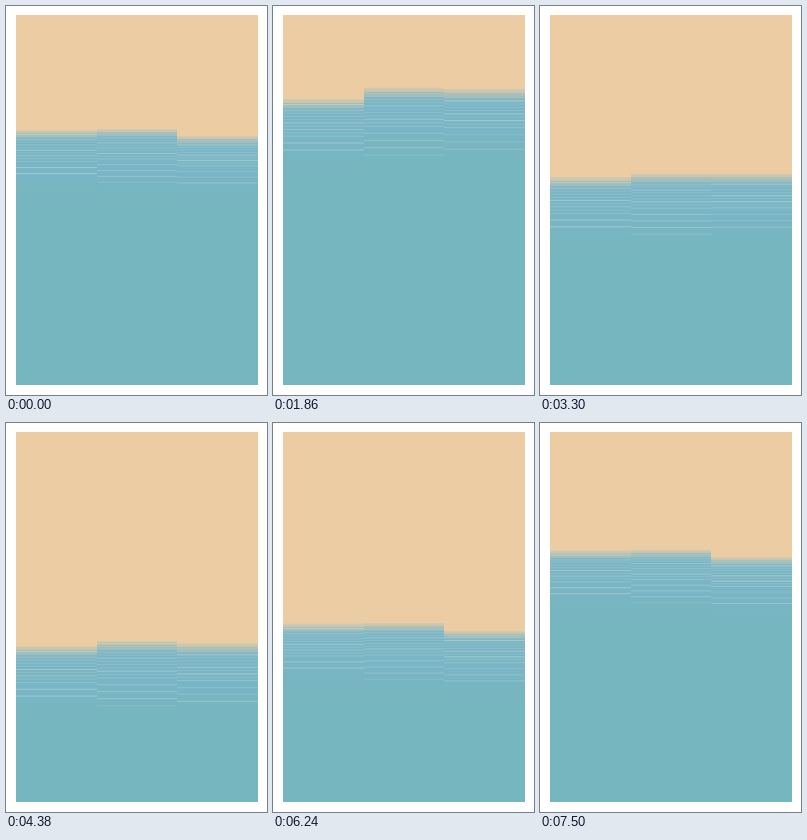
An HTML page with a canvas that plays this animation: 261x389 px, repeating every 7.56 s.

```html
<!DOCTYPE html>
<html>
<head>
<meta charset="utf-8">
<style>
html, body { margin: 0; width: 100%; height: 100%; overflow: hidden; background: #fff; }
canvas { display: block; }
</style>
</head>
<body>
<canvas id="sea" width="261" height="389"></canvas>
<script>
const ctx = document.getElementById('sea').getContext('2d');
const LOOP = 7560, STEP = 60, RAD = Math.PI / 180;
const LEFT = 10, TOP = 9, WIDTH = 242, HEIGHT = 370, DEPTH = 72;
const sand = 'rgb(235,204,163)', water = 'rgb(118,182,190)';
const blue = 'rgb(121,181,197)', foam = 'rgb(232,236,222)';

// swell is the rise and fall; chop is a second harmonic that fades with depth.
const columns = [
  { mean: 160, swell: 74.5, phase: 60, chop: 2, count: 9 },
  { mean: 155, swell: 77, phase: 62, chop: 6, count: 11 },
  { mean: 159, swell: 78, phase: 65, chop: 6, count: 10 }
];

function seeded(seed) {
  return () => (seed = seed * 16807 % 2147483647) / 2147483647;
}

function waveHeight({ mean, swell, phase, chop, count }, i, angle) {
  return mean + 4.6 * i ** 1.12
    - swell * Math.cos((angle - phase + 0.35 * i) * RAD)
    + chop * (1 - i / count) * Math.cos(2 * (angle - 157) * RAD);
}

function drawColumn(column, index, angle) {
  const x = LEFT + Math.round(WIDTH * index / 3);
  const w = LEFT + Math.round(WIDTH * (index + 1) / 3) - x;
  const random = seeded(index + 7);
  const height = i => waveHeight(column, i, angle);
  const fill = (y, h, alpha) => {
    ctx.globalAlpha = alpha;
    ctx.fillRect(x, y, w, h);
  };

  const surface = height(0);
  const fade = ctx.createLinearGradient(0, surface, 0, surface + DEPTH);
  fade.addColorStop(0.6, blue);
  fade.addColorStop(1, water);
  ctx.fillStyle = fade;
  for (let i = 0; i < 4; i++) {
    fill(height(i * 0.8), TOP + HEIGHT - height(i * 0.8), Math.min(1, 0.28 + 0.24 * i));
  }

  ctx.fillStyle = foam;
  for (let i = 0; i < column.count; i++) {
    fill(height(i), 1, 0.12 + 0.28 * random());
    // Fainter ripples fill the gaps near the surface.
    if (i > 0 && i < 6) fill(height(i + 0.5), 1, 0.16);
  }
  ctx.globalAlpha = 1;
}

function draw(now) {
  const t = Math.floor(now % LOOP / STEP) * STEP;
  ctx.clearRect(0, 0, 261, 389);
  ctx.fillStyle = sand;
  ctx.fillRect(LEFT, TOP, WIDTH, HEIGHT);
  columns.forEach((column, i) => drawColumn(column, i, t / LOOP * 360));
}

const start = performance.now();
function tick() {
  draw(performance.now() - start);
  requestAnimationFrame(tick);
}
tick();
</script>
</body>
</html>
```
